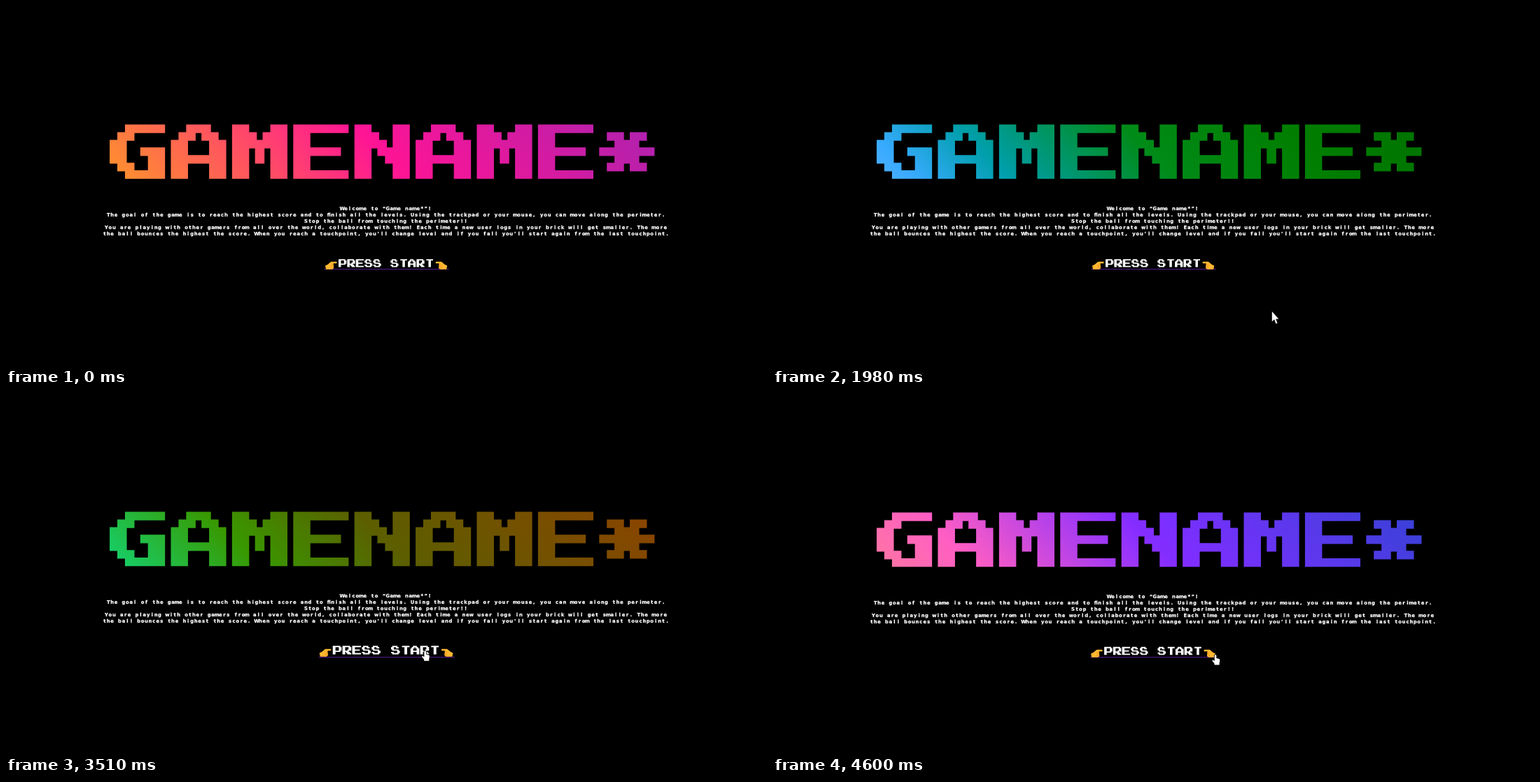
Recreate the animation shown at these times as an HTML page with a canvas. Size 1087x515 px, loop 4670 ms.

```html
<!DOCTYPE html>
<html lang="en">
<head>
<meta charset="utf-8">
<title>Game name*</title>
<style>
  html, body { margin: 0; width: 100%; height: 100%; overflow: hidden; background: #000; }
  canvas { position: absolute; left: 0; top: 0; }
</style>
</head>
<body>
<canvas id="title" width="1087" height="515" role="img" aria-label="GAMENAME*"></canvas>
<canvas id="scene" width="1087" height="515"></canvas>
<script>
const LOOP = 4670, W = 1087, H = 515;
const titleEl = document.getElementById('title');
const title = titleEl.getContext('2d');
const scene = document.getElementById('scene').getContext('2d');

// Block letters on a 7 x 7 grid: each rule says whether cell (x, y) is lit.
// d and e are the distances from the middle column and row.
const GLYPHS = {
  G: (x, y, d, e) => {
    const edge = Math.max(0, e - 1);
    return x === edge || x === edge + 1 || (e === 3 && x > 1) || (y === 3 && x > 3) || (y > 3 && x > 4);
  },
  A: (x, y, d) => y === 4 || (y < 2 ? d >= y && d <= y + 1 : d > 1),
  M: (x, y, d) => d > 1 || (y > 0 && y < 3 && d >= 2 - y) || (d === 0 && y > 1 && y < 5),
  E: (x, y, d, e) => x < 2 || e === 3 || (y === 3 && x < 6),
  N: (x, y, d) => d > 1 || x === y || x === y + 1,
  '*': (x, y, d, e) => y === 3 || (e < 3 && d <= e && d >= e - 1),
  P: (x, y) => x < 2 || (y < 5 && (y % 4 === 0 ? x < 6 : x > 4)),
  R: (x, y) => x < 2 || (y === 0 && x < 6) || (y > 0 && y < 4 && x > 4) ||
    (y === 3 && x === 4) || (y > 3 && x >= y - 2 && x <= y),
  S: (x, y) => {
    if (y % 3 === 0) return x > 0 && x < (y ? 6 : 5);
    return y < 3 ? x < 2 || (y === 1 && x > 3 && x < 6) : x > 4 || (y === 5 && x < 2);
  },
  T: (x, y) => y === 0 ? x > 0 : x === 3 || x === 4,
  ' ': () => false
};

const LINES = [
  'Welcome to “Game name*”!',
  'The goal of the game is to reach the highest score and to ﬁnish all the levels. Using the trackpad or your mouse, you can move along the perimeter.',
  'Stop the ball from touching the perimeter!!',
  'You are playing with other gamers from all over the world, collaborate with them! Each time a new user logs in your brick will get smaller. The more',
  'the ball bounces the highest the score. When you reach a touchpoint, you’ll change level and if you fall you’ll start again from the last touchpoint.'
];

// Pointer stops: time, x, y of the tip.
const STOPS = [
  [890, 912, 522], [1150, 834, 483], [1480, 733, 448], [1980, 713, 437], [2310, 642, 402],
  [2580, 611, 376], [2640, 611, 376], [3000, 599, 367], [4535, 598, 368], [4595, 632, 373], [LOOP, 632, 373]
];
const HAND_FROM = 2400;

const ARROW = new Path2D('M0 0V14.5L3.2 11.4L5.6 17.5L7.8 16.5L5.4 10.8H9.5Z');
const HAND = new Path2D('M-1.3 1Q0 -1 1.3 1V5L4.8 5.8Q6.4 6.3 6.3 8L5.6 12V14.5H-1.5V12.5L-4.6 8.6Q-4.4 6.8 -2.6 8L-1.3 9Z');
const FIST = new Path2D('M0 6.6L3.6 5L8 1.2Q9 .7 10 1H16Q17.6 2.2 16 3.5H11.6L12.2 9.6Q11.8 11.6 9.5 12H1Z');
const KNUCKLES = new Path2D('M8 5.4H11.6M8 7.5H11.8M8 9.6H11.6');

// CSS "ease" curve.
function ease(x) {
  const curve = (a, b, u) => 3 * a * u * (1 - u) ** 2 + 3 * b * u * u * (1 - u) + u ** 3;
  let lo = 0, hi = 1;
  for (let i = 0; i < 30; i++) {
    const mid = (lo + hi) / 2;
    if (curve(0.25, 0.25, mid) < x) lo = mid; else hi = mid;
  }
  return curve(0.1, 1, lo);
}

// The hue swings down to 0 and back up, one pass per period.
const hueAt = t => 360 * ease(Math.min(1, Math.abs(t - 2895) / 3060));

// Button growth while hovered, 0 to 1.
function pulseAt(t) {
  const phase = (t - 2720) / 960;
  return phase < 0 ? 0 : 1 - Math.abs(1 - 2 * (phase % 1));
}

function blockText(ctx, text, left, top, advance) {
  const p = advance / 8, ex = p * 0.12, ey = p * 0.06;
  ctx.beginPath();
  [...text].forEach((ch, i) => {
    for (let y = 0; y < 7; y++)
      for (let x = 0; x < 7; x++)
        if (GLYPHS[ch](x, y, Math.abs(x - 3), Math.abs(y - 3)))
          ctx.rect(left + i * advance + x * p - ex, top + y * p - ey, p + 2 * ex, p + 2 * ey);
  });
  ctx.fill();
}

function drawTitle(dy, hue) {
  title.clearRect(0, 0, W, H);
  const cx = 537.5, cy = 208.5 + dy, r = (779 + 78) / 4;
  const fill = title.createLinearGradient(cx - r, cy + r, cx + r, cy - r);
  fill.addColorStop(0, 'rgb(255,148,42)');
  fill.addColorStop(0.5, 'rgb(255,20,147)');
  fill.addColorStop(1, 'rgb(174,34,174)');
  title.fillStyle = fill;
  blockText(title, 'GAMENAME*', 149.4, 170.2 + dy, 87.4);
  titleEl.style.filter = `hue-rotate(${hue}deg)`;
}

function drawBody(dy) {
  const cell = 5.43;
  scene.fillStyle = scene.strokeStyle = '#fff';
  scene.lineWidth = 0.25;
  scene.font = 'bold 6.8px "DejaVu Sans", sans-serif';
  scene.textAlign = 'center';
  LINES.forEach((line, row) => {
    const chars = [...line], left = 542.6 - (chars.length - 1) * cell / 2;
    chars.forEach((ch, i) => {
      const x = left + i * cell, y = 291.6 + row * 9.05 + dy;
      scene.fillText(ch, x, y);
      scene.strokeText(ch, x, y);
    });
  });
}

function drawFist(x, y, dir) {
  scene.save();
  scene.translate(x, y);
  scene.scale(dir, 1);
  scene.fillStyle = '#ffb730';
  scene.fill(FIST);
  scene.strokeStyle = '#e39320';
  scene.lineWidth = 0.7;
  scene.stroke(KNUCKLES);
  scene.restore();
}

function drawButton(grow, dy) {
  const advance = 12.38 + 4.27 * grow;
  const left = 543.3 - 5.5 * advance, right = left + 11 * advance;
  const base = 373.3 - 2.4 * grow;
  scene.fillStyle = '#551a8b';
  scene.fillRect(left - 20.5, 376 + Math.round(-1.2 * grow), right - left + 42, 1);
  drawFist(left - 19.2, 364.8 + dy, 1);
  drawFist(right + 18.8, 364.8 + dy, -1);
  scene.fillStyle = '#fff';
  blockText(scene, 'PRESS START', left, base - advance * 7 / 8, advance);
}

function drawPointer(t) {
  const i = STOPS.findIndex(stop => stop[0] > t);
  if (i < 1) return;
  const [t0, x0, y0] = STOPS[i - 1], [t1, x1, y1] = STOPS[i];
  const k = (t - t0) / (t1 - t0);
  const shape = t < HAND_FROM ? ARROW : HAND;
  scene.save();
  scene.translate(x0 + (x1 - x0) * k, y0 + (y1 - y0) * k);
  scene.strokeStyle = '#000';
  scene.lineWidth = 1.6;
  scene.stroke(shape);
  scene.fillStyle = '#fff';
  scene.fill(shape);
  scene.restore();
}

function draw(t) {
  const grow = pulseAt(t), dy = Math.round(-2.2 * grow);
  drawTitle(dy, hueAt(t));
  scene.clearRect(0, 0, W, H);
  drawBody(dy);
  drawButton(grow, dy);
  drawPointer(t);
}

const start = performance.now();
function tick(now) {
  draw(Math.max(0, now - start) % LOOP);
  requestAnimationFrame(tick);
}
draw(0);
requestAnimationFrame(tick);
</script>
</body>
</html>
```
